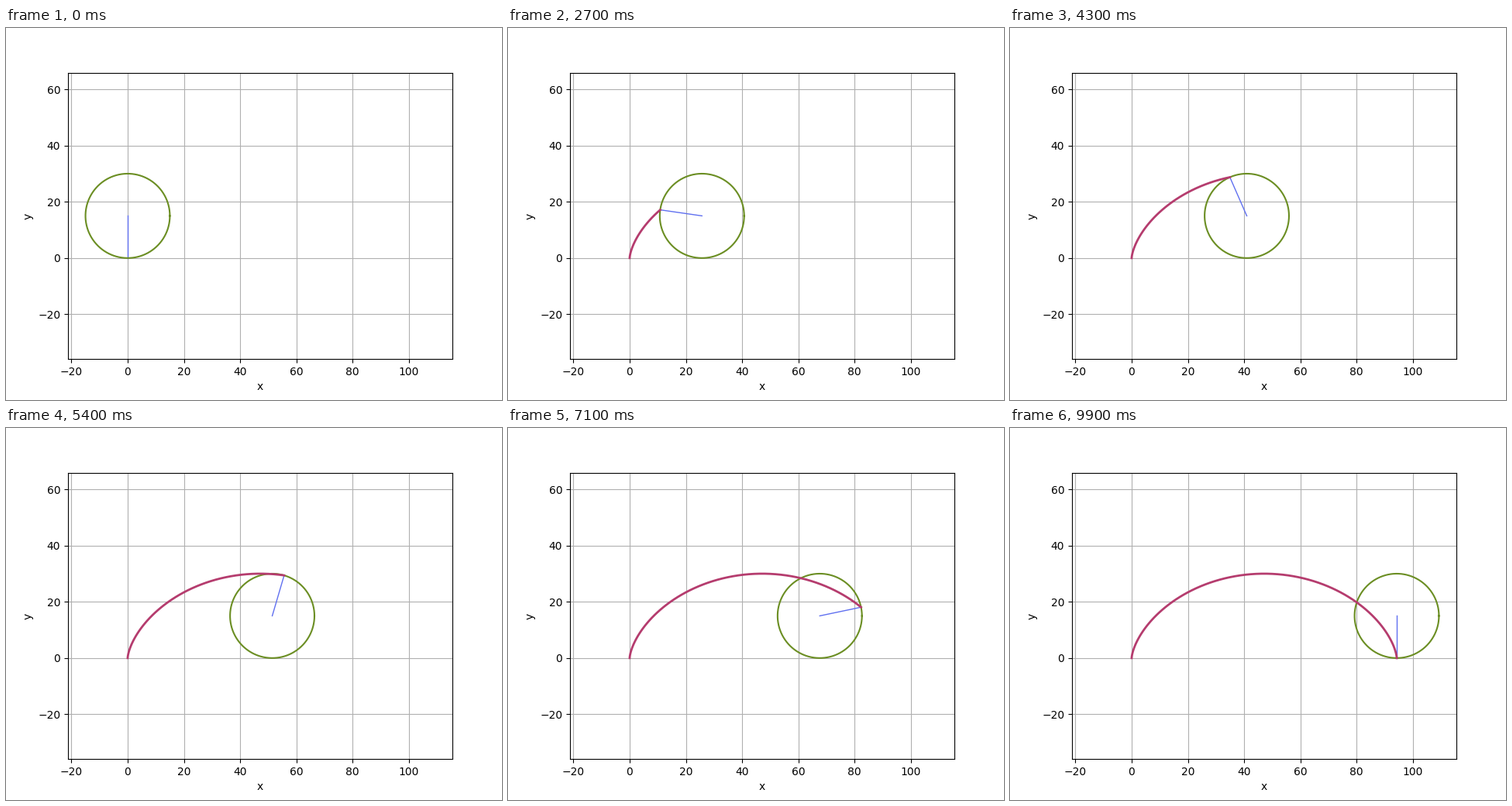
A matplotlib script that plays this animation: 640x480 px, repeating every 10 s.

```python
import numpy as np
import matplotlib.pyplot as plt
from matplotlib.animation import FuncAnimation

R = 15
FRAMES = 100

t = np.linspace(0, 2 * np.pi, FRAMES)
x = R * (t - np.sin(t))
y = R * (1 - np.cos(t))
ring_x, ring_y = R * np.cos(t), R + R * np.sin(t)

fig, ax = plt.subplots(figsize=(6.4, 4.8), dpi=100)
ax.set_xlabel("x")
ax.set_ylabel("y")
ax.grid(True)

# Limits cover the whole roll with the usual 5 % margin.
left, right = -R, R * t[-1] + R
margin = 0.05 * (right - left)
ax.set_aspect("equal", adjustable="datalim")
ax.set_xlim(left - margin, right + margin)
half = (right - left + 2 * margin) * (369.6 / 496) / 2
ax.set_ylim(R - half, R + half)

spoke, = ax.plot([], [], color="#6070f0", lw=1)
wheel, = ax.plot([], [], color="olivedrab", lw=1.5)
trace, = ax.plot([], [], color="#b53c6e", lw=2)


def update(i):
    cx = R * t[i]
    spoke.set_data([cx, x[i]], [R, y[i]])
    wheel.set_data(cx + ring_x, ring_y)
    trace.set_data(x[:i + 1], y[:i + 1])
    return spoke, wheel, trace


anim = FuncAnimation(fig, update, frames=FRAMES, interval=100,
                     repeat=True, repeat_delay=0)
plt.show()
```
